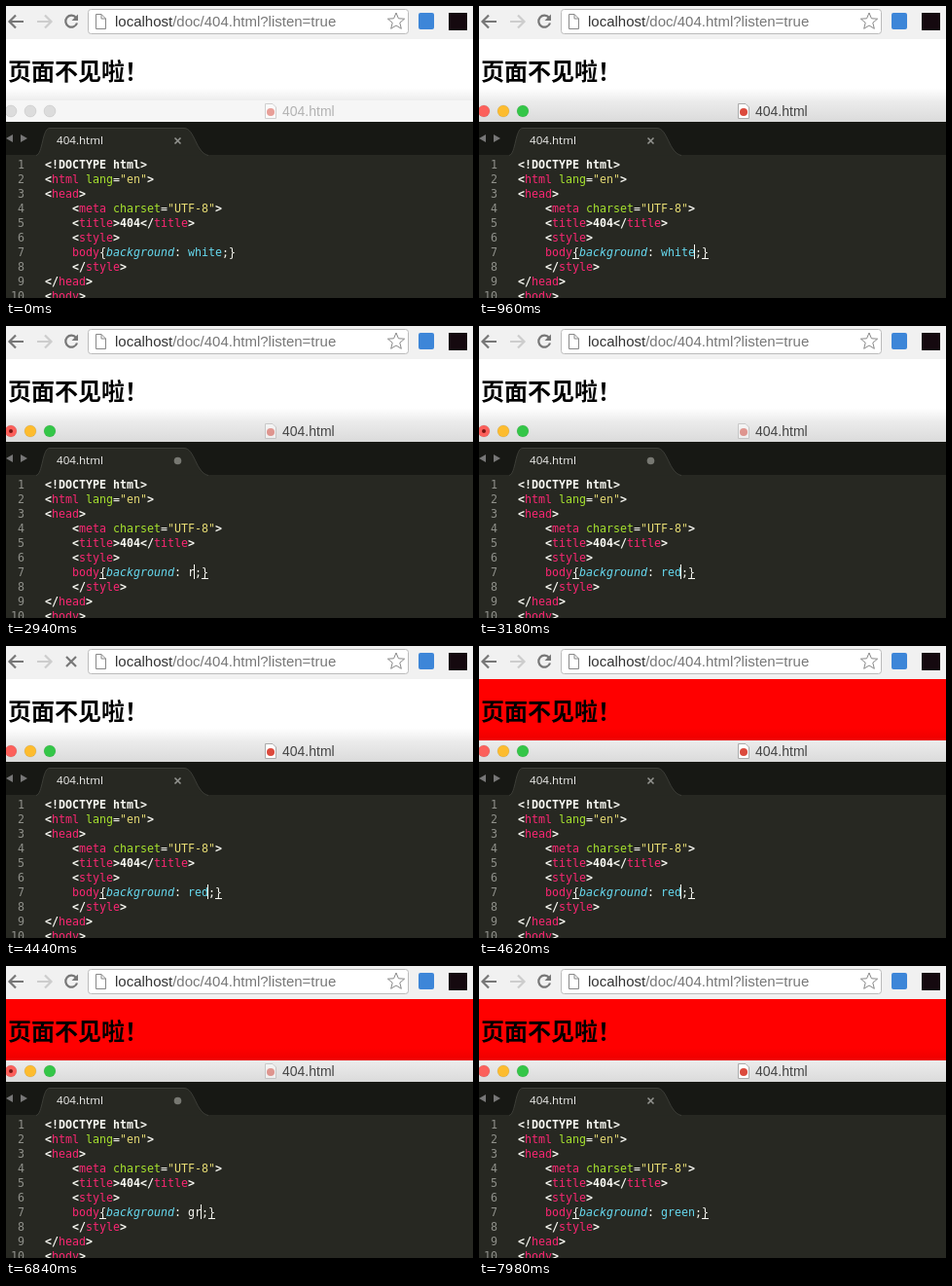
Write an HTML page that moves like this. It is 480x300 px and loops after 8 s.

```html
<!DOCTYPE html>
<html lang="zh">
<head>
<meta charset="UTF-8">
<title>404</title>
<style>
  html, body { margin: 0; width: 100%; height: 100%; overflow: hidden; background: #fff; }
  svg { display: block; width: 480px; height: 300px; }
  text { white-space: pre; }
  .ui { font-family: "Liberation Sans", Arial, sans-serif; }
  .head { font: bold 24px "Noto Sans CJK SC", "Noto Sans CJK", sans-serif; }
  .tab { font: 11.6px "Open Sans", "Noto Sans", sans-serif; }
  .code { font: 11.63px "DejaVu Sans Mono", monospace; }
</style>
</head>
<body>
<svg id="stage" viewBox="0 0 480 300">
  <defs>
    <linearGradient id="shade" x2="0" y2="1">
      <stop stop-opacity="0"/><stop offset="1" stop-opacity=".07"/>
    </linearGradient>
    <linearGradient id="metal" x2="0" y2="1">
      <stop stop-color="#ececec"/><stop offset="1" stop-color="#dadada"/>
    </linearGradient>
  </defs>

  <!-- browser -->
  <rect id="page" y="33" width="480" height="70"/>
  <rect width="480" height="34" fill="#f1f1f1"/>
  <g fill="none" stroke-width="2.2">
    <path d="M18 16H4M10 9.500L3.500 16L10 22.500" stroke="#777"/>
    <path d="M32 16H46M40 9.500L46.500 16L40 22.500" stroke="#cdcdcd"/>
    <g id="reload" stroke="#777">
      <path d="M72 12A6 6 0 1 0 73 17.500"/><path d="M74 8.500V15H67.500Z" fill="#777" stroke="none"/>
    </g>
    <path id="stop" d="M62 11L72 21M72 11L62 21" stroke="#777"/>
  </g>
  <rect x="84.500" y="3.500" width="329" height="25" rx="3" fill="#fff" stroke="#bbb"/>
  <path d="M92.500 8.500H98L102.500 13V23.500H92.500ZM98 8.500V13H102.500" fill="#fff" stroke="#888"/>
  <text class="ui" x="112" y="21" font-size="15" fill="#777"><tspan fill="#333">localhost</tspan>/doc/404.html?listen=true</text>
  <path id="star" fill="#fff" stroke="#888" stroke-linejoin="round"/>
  <rect x="424" y="7" width="16" height="17" rx="2" fill="#3d86d8"/>
  <rect x="455" y="7" width="19" height="18" fill="#15090f"/>
  <text class="head" x="2" y="76">页面不见啦！</text>
  <rect y="84" width="480" height="13" fill="url(#shade)"/>

  <!-- editor title bar -->
  <rect id="bar" y="97" width="480" height="23"/>
  <g id="lights"></g>
  <circle id="unsaved" cx="5" cy="108" r="2" fill="#7a1512"/>
  <g id="icon">
    <path d="M266.500 100.500H274L277.500 104V115.500H266.500Z" fill="#fff" stroke="#aaa"/>
    <circle cx="272" cy="109" r="4" fill="#dc4a3d"/>
  </g>
  <text class="ui" id="title" x="284" y="113" font-size="14">404.html</text>

  <!-- tabs -->
  <rect y="119" width="480" height="181" fill="#272822"/>
  <rect y="119" width="480" height="34" fill="#171814"/>
  <path d="M31 153.500C38 152 37 125.500 45 125.500H183C194 125.500 195 151 208 153.500" fill="#272822" stroke="#3d3e38"/>
  <path d="M7 132V140L0 136ZM15 132V140L22 136Z" fill="#777"/>
  <text class="tab" x="52" y="142" fill="#f0f0ee">404.html</text>
  <path id="close" d="M173.500 135.500L179.500 141.500M179.500 135.500L173.500 141.500" stroke="#92938f" stroke-width="1.600"/>
  <circle id="dirty" cx="176.500" cy="138.500" r="3.800" fill="#777872"/>

  <!-- code -->
  <g class="code" id="code"></g>
  <g class="code">
    <text id="value" x="187" y="257"></text>
    <text id="tail" y="257" fill="#f8f8f2">;}</text>
  </g>
  <g id="focus" fill="#f8f8f2">
    <rect x="96" y="259" width="7" height="1"/>
    <rect id="mark" y="259" width="7" height="1"/>
    <rect id="caret" y="245" width="1" height="15"/>
  </g>
  <g class="code" id="popup">
    <rect x="183" y="262" width="300" height="40" fill="#383933"/>
    <rect x="183" y="262" width="300" height="15" fill="#50514a"/>
    <text class="hint" x="187" y="273" fill="#f8f8f2"></text>
    <text class="hint" x="187" y="288" fill="#c4c5bd"></text>
  </g>
</svg>
<script>
const $ = id => document.getElementById(id);
const set = (id, attrs) => Object.entries(attrs).forEach(([k, v]) => $(id).setAttribute(k, v));
const show = (id, on) => set(id, { opacity: on ? 1 : 0 });
const CELL = 7, LEFT = 40, LOOP = 8000;

const COLORS = { w: '#f8f8f2', W: '#f8f8f2', p: '#f92672', g: '#a6e22e', y: '#e6db74', c: '#66d9ef', i: '#66d9ef' };

// Each token is a colour key followed by its text; W is bold, i is italic.
const LINES = [
  ['W<!DOCTYPE html>'],
  ['W<', 'phtml', 'g lang', 'w=', 'y"en"', 'W>'],
  ['W<', 'phead', 'W>'],
  ['W    <', 'pmeta', 'g charset', 'w=', 'y"UTF-8"', 'W>'],
  ['W    <', 'ptitle', 'W>404</', 'ptitle', 'W>'],
  ['W    <', 'pstyle', 'W>'],
  ['p    body', 'w{', 'ibackground', 'w: '],
  ['W    </', 'pstyle', 'W>'],
  ['W</', 'phead', 'W>'],
  ['W<', 'pbody', 'W>']
];

$('code').innerHTML = LINES.map((tokens, row) => {
  const y = 167 + row * 15;
  let col = 0;
  const spans = tokens.map(token => {
    const key = token[0], text = token.slice(1);
    const style = key === 'W' ? 'font-weight="bold"' : key === 'i' ? 'font-style="italic"' : '';
    const x = LEFT + col * CELL;
    col += text.length;
    return `<text x="${x}" y="${y}" fill="${COLORS[key]}" ${style}>${text.replace(/</g, '&lt;')}</text>`;
  });
  return `<text x="19" y="${y}" text-anchor="end" fill="#8f908a">${row + 1}</text>` + spans.join('');
}).join('');

const star = Array.from({ length: 10 }, (_, i) => {
  const r = i % 2 ? 4 : 9, a = i * Math.PI / 5;
  return (401 + r * Math.sin(a)).toFixed(1) + ' ' + (16 - r * Math.cos(a)).toFixed(1);
});
set('star', { d: 'M' + star.join('L') + 'Z' });

// Step tracks: [start time, value]
const TYPED = [
  [0, 'white'], [1740, 'whit'], [1920, 'whi'], [2100, 'wh'], [2280, 'w'], [2400, ''],
  [2940, 'r'], [3180, 'red'], [5280, 're'], [5460, 'r'], [5640, ''],
  [6600, 'g'], [6840, 'gr'], [7140, 'gre'], [7320, 'gree'], [7440, 'green']
];
const CARET = [
  [0, 0], [960, 1], [1200, 0], [1380, .3], [1440, .7], [1500, 1], [2700, 0], [2880, 1],
  [3480, .5], [3540, 0], [3660, .5], [3720, 1],
  [4140, .5], [4200, 0], [4320, .5], [4380, 1], [4680, .5], [4740, 0], [4800, 1],
  [5160, .5], [5220, 0], [5280, 1], [5940, .5], [6000, 0], [6120, .5], [6180, 1],
  [7740, .5], [7800, 0]
];
const at = (track, t) => track.findLast(([start]) => start <= t)[1];
const within = (t, ...spans) => spans.some(([a, b]) => t >= a && t < b);

function draw(t) {
  const active = t >= 960;
  const unsaved = within(t, [1740, 3900], [5280, 7920]);
  const loading = within(t, [4440, 4560]);
  const word = at(TYPED, t);
  const end = 187 + word.length * CELL;

  set('page', { fill: t >= 4500 ? '#f00' : '#fff' });
  show('reload', !loading);
  show('stop', loading);

  set('bar', { fill: active ? 'url(#metal)' : '#f6f6f6' });
  const lights = active ? ['#fc605b', '#fdbc2f', '#34c648'] : Array(3).fill('#dcdcdc');
  [...$('lights').children].forEach((c, i) => c.setAttribute('fill', lights[i]));
  set('icon', { opacity: active && !unsaved ? 1 : .5 });
  set('title', { fill: active ? '#444' : '#b2b2b2' });
  show('unsaved', unsaved);
  show('dirty', unsaved);
  show('close', !unsaved);

  $('value').textContent = word;
  set('value', { fill: /^(white|red|green)$/.test(word) ? COLORS.c : COLORS.w });
  set('tail', { x: end });
  set('mark', { x: end + CELL });
  set('caret', { x: end - 1, opacity: at(CARET, t) });
  show('focus', active);

  show('popup', within(t, [3000, 3180], [6660, 6840]));
  const hints = t < 5000 ? ['red', 'repeat'] : ['green', 'gray'];
  document.querySelectorAll('.hint').forEach((el, i) => el.textContent = hints[i]);
}

$('lights').innerHTML = [5, 25, 45].map(x => `<circle cx="${x}" cy="108" r="6" stroke="#000" stroke-opacity=".08"/>`).join('');

const began = performance.now();
function tick() {
  draw((performance.now() - began) % LOOP);
  requestAnimationFrame(tick);
}
tick();
</script>
</body>
</html>
```
